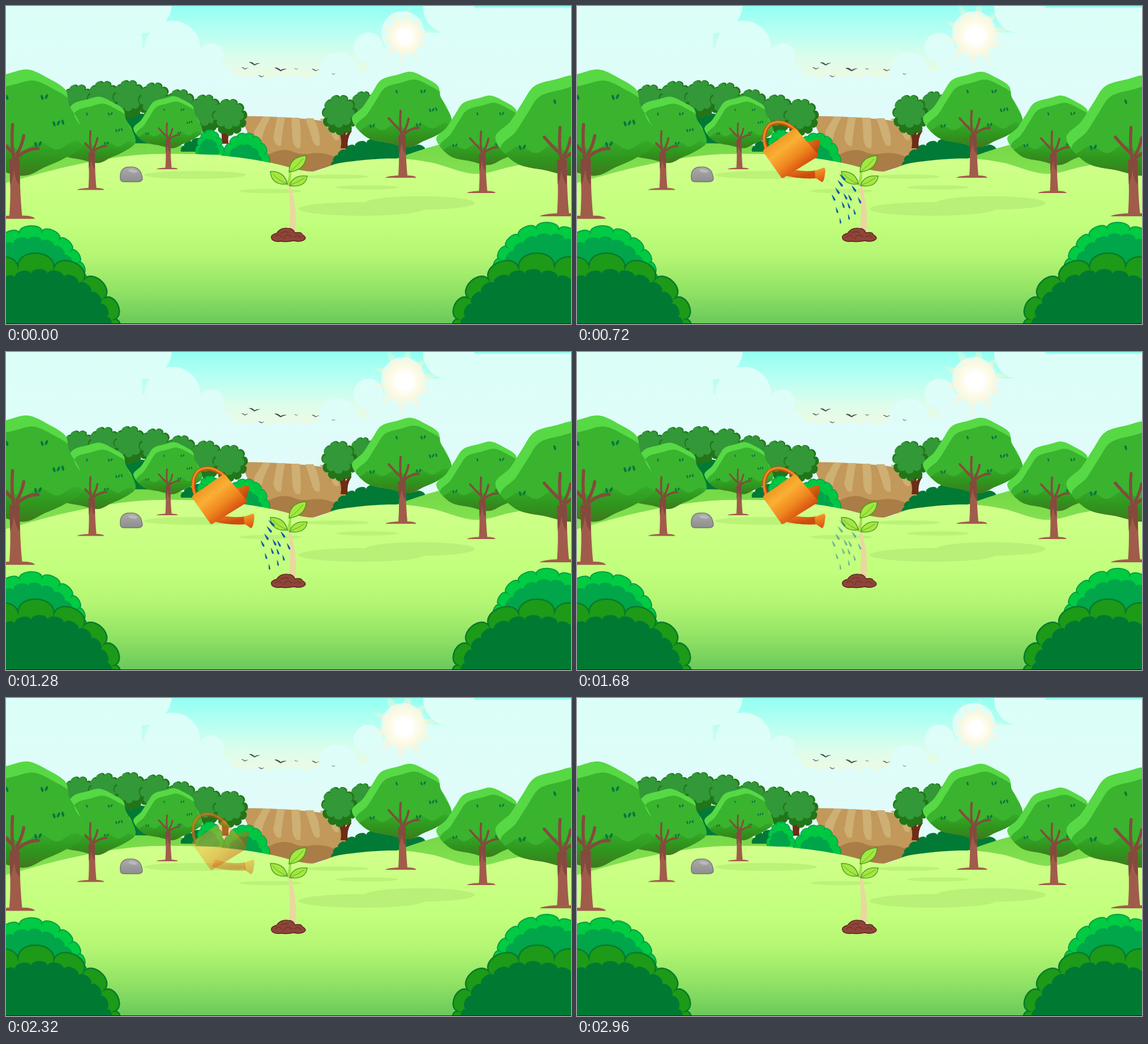
Animation, 998 px wide and 561 px high, one loop 3 s. Source, as an HTML page with a canvas:

```html
<!DOCTYPE html>
<html lang="en">
<head>
<meta charset="utf-8">
<title>Garden</title>
<style>
html, body { margin: 0; width: 100%; height: 100%; overflow: hidden; background: #dcfff8; }
canvas { display: block; width: 998px; height: 561px; }
</style>
</head>
<body>
<canvas id="stage" width="998" height="561"></canvas>
<script>
const W = 998, H = 561, LOOP = 3000, BEAT = 1000;
const { sin, cos, PI, min, max } = Math;
const ctx = document.getElementById('stage').getContext('2d');

function fill(color, path) {
  ctx.fillStyle = color;
  path ? ctx.fill(path) : ctx.fill();
}

function outline(color, width, path) {
  ctx.strokeStyle = color;
  ctx.lineWidth = width;
  ctx.stroke(path);
}

function addStops(gradient, colors) {
  colors.forEach((c, i) => gradient.addColorStop(i / (colors.length - 1), c));
  return gradient;
}

// Gradients with evenly spaced colours
const linear = (x0, y0, x1, y1, ...colors) => addStops(ctx.createLinearGradient(x0, y0, x1, y1), colors);
const radial = (x, y, r, ...colors) => addStops(ctx.createRadialGradient(x, y, 0, x, y, r), colors);

function ellipse(x, y, rx, ry, color, turn = 0) {
  ctx.beginPath();
  ctx.ellipse(x, y, rx, ry, turn, 0, PI * 2);
  fill(color);
}

function group(paint) {
  ctx.save();
  paint();
  ctx.restore();
}

// Smooth curve through points, closed or run down to a floor
function smooth(pts, floor) {
  const n = pts.length, p = new Path2D();
  const at = i => floor ? pts[max(0, min(n - 1, i))] : pts[(i + n) % n];
  p.moveTo(...pts[0]);
  for (let i = 0; i < (floor ? n - 1 : n); i++) {
    const [a, b, c, d] = [at(i - 1), at(i), at(i + 1), at(i + 2)];
    p.bezierCurveTo(b[0] + (c[0] - a[0]) / 6, b[1] + (c[1] - a[1]) / 6,
      c[0] - (d[0] - b[0]) / 6, c[1] - (d[1] - b[1]) / 6, c[0], c[1]);
  }
  if (floor) {
    p.lineTo(pts[n - 1][0], floor);
    p.lineTo(pts[0][0], floor);
  }
  p.closePath();
  return p;
}

// Leafy bumps along an ellipse, clockwise from an angle measured from the top
function leafy(cx, cy, rx, ry, from, to, step, decay = 1, bulge = 0.4) {
  const p = new Path2D();
  const spot = a => [cx + sin(a) * rx, cy - cos(a) * ry];
  p.moveTo(...spot(from));
  for (let a = from; a < to - 0.02; step *= decay) {
    const [x0, y0] = spot(a);
    a = min(a + step, to);
    const [x1, y1] = spot(a);
    const nx = (y1 - y0) * bulge, ny = (x0 - x1) * bulge;
    p.bezierCurveTo(x0 + nx, y0 + ny, x1 + nx, y1 + ny, x1, y1);
  }
  return p;
}

const dome = (cx, cy, rx, ry, bumps) => leafy(cx, cy, rx, ry, -PI / 2, PI / 2, PI / bumps);

function sky() {
  ctx.fillStyle = linear(0, 0, 0, 135, '#93fff2', '#b6fff3', '#dbfdec', '#f1fae1');
  ctx.fillRect(0, 0, W, 300);
  const cloud = linear(0, 0, 0, 220, '#dbfff8', '#e1fbfa');
  const bump = (x, y, r, left) => {
    ellipse(x, y, r, r, cloud);
    ctx.fillRect(left, y, left ? W : x, 300);
  };
  bump(240, -5, 53, 0);
  bump(294, 75, 49, 0);
  bump(363, 88, 22, 0);
  bump(374, 128, 27, 0);
  bump(586, 116, 34, 586);
  bump(640, 73, 26, 640);
  bump(701, 47, 38, 701);
  bump(782, 3, 45, 782);
  for (let x = 412; x < 570; x += 34) ellipse(x, 154, 31, 31, cloud);
  ctx.fillRect(0, 140, W, 160);
}

function sun(pulse) {
  const x = 705 - 2 * pulse, y = 54 - 4 * pulse, reach = 64 + 26 * pulse, rays = 10;
  ctx.beginPath();
  for (let i = 0; i < rays * 2; i++) {
    const a = (i - 0.6) * PI / rays;
    const r = i % 2 ? 23 + 8 * pulse : reach * (0.85 + 0.15 * sin(i * 2.4));
    ctx.lineTo(x + cos(a) * r, y + sin(a) * r);
  }
  ctx.closePath();
  fill(radial(x, y, reach, 'rgba(255,248,222,1)', 'rgba(255,242,212,.75)', 'rgba(255,243,215,.3)', 'rgba(255,244,220,0)'));
  const r = 35 + 13 * pulse;
  ellipse(x, y, r, r, radial(x, y, r, '#fff', '#fff', 'rgba(255,251,228,.75)', 'rgba(255,247,220,0)'));
}

function birds(flap) {
  const flock = [[439, 102, 10], [422, 110, 6.5], [451, 124, 5.5], [485, 112, 11], [513, 111, 4], [547, 113, 7], [579, 120, 4]];
  const wings = new Path2D(`M-10 ${-3 + flap}Q-4 -4 0 1Q4 -2 10 ${-1 - flap}Q4 0 0 3Q-4 0 -10 ${-3 + flap}Z`);
  for (const [x, y, size] of flock) group(() => {
    ctx.translate(x, y);
    ctx.scale(size / 10, size / 10);
    fill('#454a48', wings);
  });
}

function field() {
  fill('#c2985b', new Path2D('M414 194Q500 194 580 205L604 262L540 293L452 282Z'));
  for (let i = 0; i < 5; i++) {
    const top = 454 + 25 * i, foot = 434 + 34 * i, y = 236 + 14 * sin(i * PI / 4);
    fill('#ceaf74', new Path2D(`M${top} ${195 + i}h14Q${foot + 20} 220 ${foot + 18} ${y}Q${foot + 8} ${y + 4} ${foot + 4} ${y - 14}Z`));
  }
  fill('#a97d45', new Path2D('M458 266Q482 249 505 256Q520 264 540 260Q565 256 598 274L540 293L455 284Z'));
}

function farTree(x, y, rx, ry) {
  fill('#227519', leafy(x, y, rx, ry, 0, PI * 2, PI / 5.5, 1, 0.55));
  fill('#329838', leafy(x - 2, y - ry * 0.2, rx * 0.86, ry * 0.75, 0, PI * 2, PI / 4.5, 1, 0.6));
}

function farTrunk(x, y) {
  fill('#6d2d16', new Path2D(`M${x - 6} ${y + 32}q4 -17 -5 -32l3 -3l6 11l2 -15h4l-1 16l8 -10l3 2q-10 15 -7 31z`));
}

// Leans the trees, keeping the ground still
function sway(amount, paint) {
  group(() => {
    ctx.transform(1, 0, -amount, 1, amount * 260, 0);
    paint();
  });
}

function farTrees(pulse) {
  sway(0.024 * pulse, () => {
    for (let i = 0; i < 6; i++) farTree(128 + 45 * i, 172 - 8 * sin(i * 0.9) + max(0, i - 3) * 5, 24, 30);
    farTrunk(386, 211);
    farTree(395, 196, 26, 28);
  });
  sway(-0.022 * pulse, () => {
    farTree(632, 178, 18, 25);
    farTrunk(597, 219);
    farTree(590, 192, 26, 31);
  });
}

// The tree stands with its foot at 0, 0
const crown = smooth([[-87, -103], [-67, -126], [-51, -151], [-35, -173], [-6, -182], [18, -187], [42, -177], [65, -162],
  [70, -142], [82, -122], [89, -95], [66, -77], [40, -65], [14, -54], [-20, -61], [-60, -71]]);
const trunk = new Path2D('M-5 -4C-3 -30 -4 -50 -5 -75L8 -75C8 -45 9 -25 11 -4Q25 -4 27 0L-28 0Q-25 -3 -5 -4Z');
const branches = new Path2D('M1 -72Q-3 -92 -1 -118M0 -82Q-9 -90 -22 -105M4 -76Q16 -88 31 -88M4 -80Q11 -92 13 -104');
const shade = new Path2D('M-100 -50');
for (let x = -100; x <= 100; x += 4) shade.lineTo(x, -90 - x * 0.03 + 5 * sin(x / 7));
shade.lineTo(100, -50);

function tree(x, y, size) {
  group(() => {
    ctx.translate(x, y);
    ctx.scale(size, size);
    group(() => {
      ctx.clip(crown);
      fill('#56d944', crown);
      ctx.translate(7, 14);
      fill('#3ab32e', crown);
      ctx.translate(-7, -14);
      fill(linear(0, -95, 0, -54, '#34a828', '#2f951d', '#41781f'), shade);
    });
    for (const [cx, cy, count] of [[-8, -152, 1], [36, -152, 2], [51, -119, 3], [28, -93, 2], [-54, -91, 2]])
      for (let i = 0; i < count; i++) ellipse(cx + i * 5.5, cy - i, 1.5, 3.3, '#087642', i % 2 ? 0.45 : -0.3);
    fill('#a15b4b', trunk);
    fill('#844a3d', new Path2D('M-5 -75L8 -75L8 -42Q2 -48 1 -62Q-1 -48 -4 -42Z'));
    ctx.lineCap = 'round';
    outline('#854a3d', 4, branches);
  });
}

function bushesBehind() {
  const dark = '#007a35';
  fill(dark, dome(222, 262, 62, 70, 9));
  fill(dark, dome(880, 230, 28, 54, 7));
  fill(dark, dome(670, 285, 94, 46, 13));
}

function brightBush(x, y, rx, ry) {
  const p = dome(x, y, rx, ry, 8);
  fill('#00c742', p);
  outline('#00a247', 1.5, p);
  fill('#00a549', dome(x - 2, y, rx * 0.74, ry * 0.64, 6));
}

function land() {
  const hill = linear(0, 240, 0, 310, '#74d846', '#86e252');
  fill(hill, smooth([[-20, 270], [120, 246], [270, 243], [350, 253], [430, 275]], 330));
  fill('#007a35', dome(346, 257, 36, 20, 6));
  brightBush(360, 262, 21, 42);
  brightBush(423, 281, 38, 54);
  fill(hill, smooth([[660, 280], [760, 246], [850, 232], [930, 260]], 310));
  const grass = linear(0, 262, 0, 561, '#d2ff8c', '#c9ff83', '#c2ff7d', '#b4f673', '#92e365', '#69c95a');
  fill(grass, smooth([[-10, 315], [110, 283], [220, 264], [320, 261], [400, 266], [470, 277], [540, 292], [590, 277],
    [680, 269], [750, 276], [828, 296], [900, 282], [1010, 265]], 570));
  for (const [x, y, rx] of [[334, 298, 90], [467, 326.5, 55], [585, 301, 56], [638, 320, 55]])
    ellipse(x, y, rx, rx > 80 ? 7 : 3.8, '#bbf278');
  ctx.beginPath();
  ctx.ellipse(628, 358, 111, 12, 0, 0, 7);
  ctx.ellipse(731, 347.5, 97, 12, 0, 0, 7);
  fill('#b9f077');
}

function stone() {
  const p = new Path2D('M202 305Q200 284 219 284Q239 283 241 305Q240 310 232 310L209 310Q203 310 202 305Z');
  fill(linear(0, 284, 0, 310, '#ababab', '#8e8e8e'), p);
  outline('#747474', 1.3, p);
  ellipse(224, 291, 8, 3, '#b9b9b9', 0.15);
}

function leaf(shape, vein) {
  const p = new Path2D(shape), v = new Path2D(vein);
  fill('#a3e83f', p);
  outline('#4a9727', 1.4, p);
  outline('#4a9727', 0.8, v);
}

function sprout() {
  fill('#ead79f', new Path2D('M495 305Q499 312 501 340Q503 370 499 398L512 398Q514 365 508 338Q503 320 503 305Z'));
  fill('#9be243', new Path2D('M496 317Q499 302 501 289L504 290L503 316Z'));
  leaf('M500 293Q500 266 530 264Q530 289 500 293Z', 'M501 292Q514 283 525 269');
  leaf('M497 314Q469 317 467 292Q492 291 497 314Z', 'M496 313Q481 308 471 296');
  leaf('M501 317Q507 297 532 300Q529 321 501 317Z', 'M502 316Q516 311 527 303');
  const soil = new Path2D('M470 412Q465 404 478 401Q484 391 497 392Q508 392 510 400Q522 398 523 403Q533 409 526 413Q517 417 509 414Q495 417 485 415Q476 417 470 412Z');
  fill('#8e4438', soil);
  outline('#59251f', 1.4, soil);
  outline('#6b3029', 1.2, new Path2D('M476 407Q483 401 487 408M490 411Q496 399 505 408M509 408Q516 402 521 409M485 401Q493 396 499 400'));
}

function can() {
  ctx.lineCap = 'round';
  outline('#c84f12', 7, new Path2D('M334 250Q325 224 340 210Q362 197 388 221'));
  outline('#ec8a24', 3.5, new Path2D('M333 250Q325 224 340 209Q362 196 388 220'));
  fill(linear(405, 235, 428, 258, '#e87918', '#b7410b'), new Path2D('M402 241L427 235Q431 237 429 243L423 263Z'));
  fill(linear(370, 285, 375, 306, '#ef8d20', '#cf4b10'), new Path2D('M370 285Q397 294 422 290L424 304Q392 306 363 298Z'));
  fill(linear(352, 232, 396, 287, '#ee9422', '#fab034', '#f08820', '#d7500f'),
    new Path2D('M330 253L382 217Q386 215 389 219L424 260Q427 264 423 267L365 303Q361 305 359 300L330 259Q328 256 330 253Z'));
  fill(linear(425, 287, 432, 311, '#f59a28', '#d9510e'), new Path2D('M420 291L436 285Q440 286 438 296Q437 308 433 311L421 303Z'));
}

function drops() {
  const spots = [[469, 302], [465, 313], [460, 326], [489, 322], [474, 336], [453, 338], [482, 338], [470, 351],
    [480, 352], [499, 343], [459, 360], [490, 363], [480, 372], [465, 379]];
  for (const [x, y] of spots) group(() => {
    const size = 1 - (y - 302) / 250;
    ctx.translate(x, y);
    ctx.rotate((y - 302) / 130 - 0.75);
    ctx.scale(size, size);
    fill('#075ea6', new Path2D('M0 -8Q2 0 2 4Q2 7 0 7Q-2 7 -2 4Q-2 0 0 -8Z'));
  });
}

function backBush() {
  const p = leafy(48, 500, 92, 104, -0.8, PI / 2, 0.53, 0.83, 0.36);
  p.lineTo(-30, 510);
  fill('#00cb42', p);
  outline('#009f43', 2, p);
  fill('#00a649', leafy(44, 505, 84, 92, -1.4, PI / 2, 0.36, 0.95));
}

function frontBush() {
  const p = leafy(45, 575, 150, 118, -0.62, 1.56, 0.46, 0.93, 0.5);
  p.lineTo(-60, 600);
  fill('#1d9a17', p);
  outline('#087a2c', 2.5, p);
  fill('#007a33', leafy(60, 575, 122, 103, -PI / 2, PI / 2, 0.24));
}

function mirrored(axis, lift, paint) {
  group(() => {
    ctx.translate(axis, -lift);
    ctx.scale(-1, 1);
    paint();
  });
}

const ramp = (t, from, to) => max(0, min(1, (t - from) / (to - from)));

function visible(alpha, paint) {
  if (alpha > 0) group(() => {
    ctx.globalAlpha = alpha;
    paint();
  });
}

function frame(t) {
  const beat = t % BEAT / BEAT;
  const pulse = sin(PI * beat) ** 2;
  const flap = max(0, sin(2 * PI * (beat - 0.38)));
  sky();
  sun(pulse);
  birds(flap);
  field();
  bushesBehind();
  farTrees(pulse);
  land();
  stone();
  tree(285, 288, 0.69);
  tree(150, 324.5, 0.88);
  tree(13, 375.5, 1.41);
  tree(698, 303, 1);
  tree(840, 330, 0.92);
  tree(980, 371, 1.33);
  visible(ramp(t, 120, 300) * ramp(t, 2420, 2200), can);
  sprout();
  visible(ramp(t, 440, 640) * ramp(t, 1780, 1560), drops);
  backBush();
  mirrored(1000, 6, backBush);
  frontBush();
  mirrored(990, 0, frontBush);
  ctx.fillStyle = '#10240f';
  ctx.fillRect(0, H - 1, W, 1);
}

const start = performance.now();
function tick() {
  frame((performance.now() - start) % LOOP);
  requestAnimationFrame(tick);
}
tick();
</script>
</body>
</html>
```
